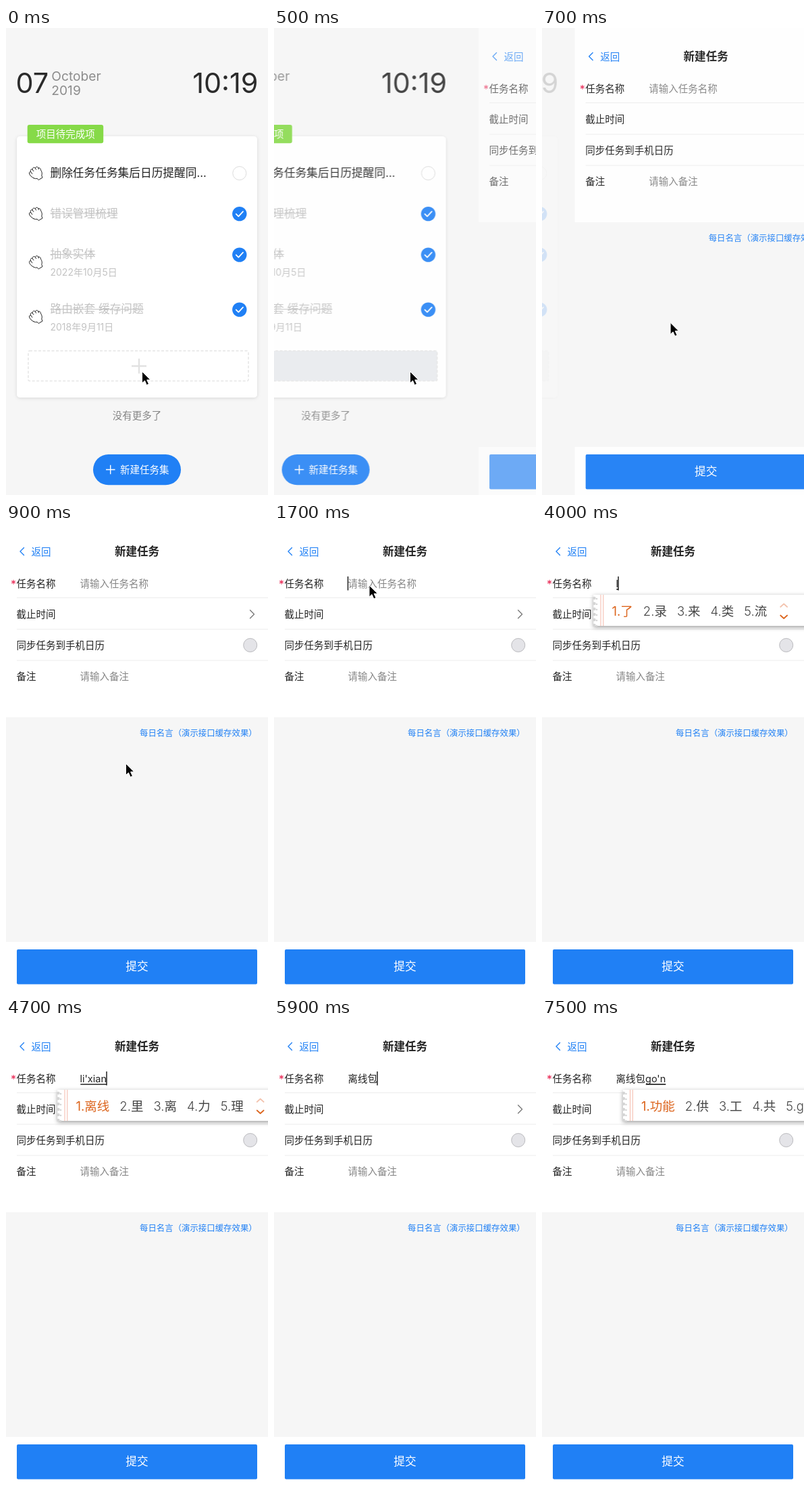
An HTML page that plays this animation: 388 by 690 pixels, repeating every 8000 ms.

```html
<!DOCTYPE html>
<html lang="zh">
<head>
<meta charset="utf-8">
<title>任务</title>
<style>
html, body { margin: 0; width: 100%; height: 100%; overflow: hidden; background: #f6f6f6; }
svg { display: block; width: 100%; height: 100%; }
text { font-family: Inter, "Noto Sans CJK SC", "Noto Sans CJK", sans-serif; font-size: 14.5px; fill: #222; white-space: pre; }
.item { font-size: 16.7px; }
.done { fill: #c3c3c3; }
.date { font-size: 14px; fill: #c3c3c3; }
.clock { font-size: 41.4px; fill: #2b2b2b; }
.month { font-size: 19.2px; fill: #8c8c8c; }
.hint { fill: #868686; }
.link { fill: #2080f5; font-weight: 500; }
.white { fill: #fff; }
.title { font-size: 16.56px; font-weight: 700; }
.cand { font-size: 18.5px; fill: #444; font-weight: 300; }
.line { fill: none; stroke-linecap: round; stroke-linejoin: round; }
</style>
</head>
<body>
<svg viewBox="0 0 388 690">
  <defs>
    <filter id="soft" x="-10%" y="-10%" width="120%" height="120%">
      <feDropShadow dx="0" dy="1" stdDeviation="2.5" flood-color="#000" flood-opacity=".13"/>
    </filter>
    <filter id="lift" x="-10%" y="-30%" width="120%" height="170%">
      <feDropShadow dx="0" dy="2" stdDeviation="3" flood-color="#000" flood-opacity=".4"/>
    </filter>
    <g id="hand" class="line" stroke="#222" stroke-width="1">
      <path d="M8 18.5 C4.500 17 1.500 14 1 11.500 C.6 9.500 2 8.500 3.300 9.200 C2 6.500 3.500 4.500 5.600 5.600 C5.500 2.800 8 1.700 9.800 3.400 C11 1 13.500 1.200 14.300 3.300 C16.500 2.700 18 4.200 18 6.400 C19.800 9 20.300 11.500 19.300 14.500 L20.500 17.500 L14.800 21 L12.500 18.800 C11 19.300 9.500 19.200 8 18.500"/>
      <path d="M3.300 9.200 L5.300 12 M5.600 5.600 L7.300 8 M9.800 3.400 L11 5.600 M14.300 3.300 L14.800 5"/>
    </g>
    <g id="tick">
      <circle r="10.700" fill="#2080f5"/>
      <path class="line" d="M-5 .2 L-1.500 3.700 L5.200 -3.400" stroke="#fff" stroke-width="1.800"/>
    </g>
  </defs>
  <rect width="388" height="690" fill="#f6f6f6"/>

  <g id="home">
    <text class="clock" x="14.500" y="95.500">07</text>
    <text class="month" x="67.300" y="78">October</text>
    <text class="month" x="67.300" y="99">2019</text>
    <text class="clock" x="373.500" y="95.500" text-anchor="end">10:19</text>
    <rect x="16" y="160" width="356" height="386" rx="5" fill="#fff" filter="url(#soft)"/>
    <rect x="31.700" y="143" width="112.500" height="27.300" rx="3" fill="#86da48"/>
    <text class="white" x="88.300" y="162" text-anchor="middle">项目待完成项</text>
    <g id="items"></g>
    <rect id="add" x="33" y="477" width="326" height="44.500" rx="2" fill="none" stroke="#e5e5e5" stroke-width="1.500" stroke-dasharray="4 2.500"/>
    <path id="plus" d="M186 499.500 H208 M197 488.500 V510.500" stroke="#e2e2e2" stroke-width="2.500"/>
    <text class="hint" x="194" y="577.500" text-anchor="middle">没有更多了</text>
    <rect x="129" y="630" width="130" height="45.300" rx="22.600" fill="#2080f5"/>
    <path d="M148 652.500 H161.500 M154.700 645.800 V659.200" stroke="#fff" stroke-width="1.400"/>
    <text class="white" x="169" y="658" font-weight="500">新建任务集</text>
  </g>

  <g id="form">
    <rect width="388" height="690" fill="#f6f6f6"/>
    <rect width="388" height="287" fill="#fff"/>
    <rect y="619" width="388" height="71" fill="#fff"/>
    <path class="line" d="M26.500 36.500 L21 42 L26.500 47.500" stroke="#2080f5" stroke-width="1.400"/>
    <text class="link" x="37.500" y="47.500">返回</text>
    <text class="title" x="194" y="48" text-anchor="middle">新建任务</text>
    <path d="M16 110.500 H388 M16 157 H388 M16 203 H388" stroke="#ececec"/>
    <text x="7" y="96" style="fill:#e8204e;font-size:16px">*</text>
    <text x="15.500" y="94.500">任务名称</text>
    <text x="15.500" y="140">截止时间</text>
    <text x="15.500" y="185.500">同步任务到手机日历</text>
    <text x="15.500" y="231.500">备注</text>
    <text class="hint" x="109.500" y="231.500">请输入备注</text>
    <path class="line" d="M361.500 128.700 L367.500 134.700 L361.500 140.700" stroke="#777" stroke-width="1.300"/>
    <circle cx="361.700" cy="180.500" r="10" fill="#e4e4e8" stroke="#b9b9bd"/>
    <text class="link" x="198" y="314.500" style="font-size:12.420px">每日名言（演示接口缓存效果）</text>
    <rect x="16" y="630" width="356" height="51.500" rx="2" fill="#2080f5"/>
    <text class="white item" x="194" y="661" text-anchor="middle">提交</text>
    <text id="hint" class="hint" x="109.500" y="94.500">请输入任务名称</text>
    <text id="value" x="109.500" y="94.500"></text>
    <path id="under" stroke="#222" stroke-width="1.700"/>
    <path id="caret" stroke="#111" stroke-width="1.400"/>
    <g id="ime">
      <rect y="106" width="420" height="46" fill="#fff" filter="url(#lift)"/>
      <g id="holes" fill="#d5d5d5"></g>
      <path d="M10.500 106 V152 M14.300 106 V152" stroke="#f4b9aa"/>
      <text id="cands" class="cand" x="27" y="137"></text>
      <g id="arrows" class="line" stroke-width="1.700">
        <path d="M-5 124 L0 119.500 L5 124" stroke="#f3c3ae"/>
        <path d="M-5 136.500 L0 141 L5 136.500" stroke="#dc641c"/>
      </g>
    </g>
  </g>

  <path id="mouse" d="M0 0 V17.200 L4 13.600 L6.800 20 L10 18.600 L7.200 12.400 H12.400 Z" fill="#000" stroke="#fff" stroke-width="1" stroke-linejoin="round"/>
</svg>
<script>
const LOOP = 8000;
const $ = id => document.getElementById(id);
const show = (el, on) => el.setAttribute('visibility', on ? 'inherit' : 'hidden');
const clamp = v => Math.min(1, Math.max(0, v));
const smooth = v => v * v * (3 - 2 * v);
const move = (el, x, y = 0) => el.setAttribute('transform', `translate(${x} ${y})`);

// text, centre line, optional date, hand position
const items = [
  ['删除任务任务集后日历提醒同...', 214, '', 214],
  ['错误管理梳理', 274, '', 274],
  ['抽象实体', 334.5, '2022年10月5日', 345.5],
  ['路由嵌套 缓存问题', 415.5, '2018年9月11日', 426]
];
$('items').innerHTML = items.map(([name, y, date, handY], i) => `
  <use href="#hand" x="33.500" y="${handY - 10.5}"/>
  <text class="item${i ? ' done' : ''}" x="65.500" y="${y + 5.5}">${name}</text>
  <text class="date" x="65.500" y="${y + 31}">${date}</text>
  ${i ? `<use href="#tick" x="345.800" y="${y + 0.6}"/>`
      : `<circle cx="345.800" cy="${y + 0.6}" r="10" fill="#fff" stroke="#dcdcdc"/>`}`).join('');

function strike() {
  document.querySelectorAll('.done').forEach((el, i) => {
    const y = items[i + 1][1];
    const w = el.getComputedTextLength();
    el.insertAdjacentHTML('afterend', `<path d="M65.500 ${y} h${w}" stroke="#c3c3c3" stroke-width="1.200"/>`);
  });
}
strike();

for (let y = 111; y < 152; y += 8) {
  $('holes').innerHTML += `<circle cx="1" cy="${y}" r="2.200"/><circle cx="4.500" cy="${y + 1}" r="1.300"/>`;
}

// time, committed text, composing text, candidates
const typing = [
  [0, '', ''],
  [2200, 'l', ''],
  [2400, 'li', ''],
  [2900, 'l', ''],
  [3000, '', ''],
  [3900, '', 'l', '了 录 来 类 流'],
  [4100, '', 'li', '里 离 力 理 立'],
  [4300, '', "li'x", '练习 联系 里 离 力'],
  [4400, '', "li'xi", '练习 离席 里 离 力'],
  [4500, '', "li'xia", '立夏 里 离 力 理'],
  [4700, '', "li'xian", '离线 里 离 力 理'],
  [5100, '', "li'xian'b", '离线包 离线 里 离 力'],
  [5300, '', "li'xian'ba", '离线包 离线 里 离 力'],
  [5500, '', "li'xian'bao", '离线包 离线 里 离 力'],
  [5900, '离线包', ''],
  [6700, '离线包', 'g', '个 给 过 该 跟'],
  [6800, '离线包', 'go', '够 狗 购 构 go'],
  [7000, '离线包', "go'n", '功能 供 工 共 go']
];
const blinks = [[3400, 3900], [6400, 6700], [7500, 8000]];

// time, x, y of the pointer tip
const track = [
  [0, 201.5, 507.5], [520, 201.5, 507.5], [900, 177.5, 356],
  [1250, 150, 130], [1500, 141, 92], [LOOP, 141, 92]
];

let shown = null;
let caretX = 109.5;

function drawField(step) {
  const [, fixed, draft, list] = step;
  const value = $('value');
  value.textContent = fixed;
  const startX = 109.5 + (fixed ? value.getComputedTextLength() : 0);
  value.textContent = fixed + draft;
  caretX = 109.5 + (fixed + draft ? value.getComputedTextLength() : 0);
  show($('hint'), !(fixed + draft));
  show($('under'), draft);
  $('under').setAttribute('d', `M${startX + 0.8} 98 H${caretX}`);
  show($('ime'), draft);
  if (!draft) return;
  move($('ime'), startX - 33);
  const cands = $('cands');
  cands.innerHTML = list.split(' ').map((word, i) =>
    `<tspan dx="${i ? 15 : 0}"${i ? '' : ' fill="#dc641c" font-weight="400"'}>${i + 1}.${word}</tspan>`).join('');
  move($('arrows'), cands.getEndPositionOfChar(cands.getNumberOfChars() - 1).x + 25);
}

function drawSlide(t) {
  const p = smooth(clamp((t - 374) / 420));
  move($('home'), -388 * p ** 0.787);
  $('home').setAttribute('opacity', 1 - p ** 1.36);
  show($('home'), p < 1);
  move($('form'), 388 * (1 - p));
  $('form').setAttribute('opacity', p ** 0.3);
  show($('form'), p > 0);
  const pressed = t >= 374;
  $('add').setAttribute('fill', pressed ? '#e9ebee' : 'none');
  show($('plus'), !pressed);
}

function drawMouse(t) {
  const i = track.findIndex(k => k[0] > t);
  const [a, b] = [track[i - 1], track[i]];
  const p = (t - a[0]) / (b[0] - a[0]);
  move($('mouse'), a[1] + (b[1] - a[1]) * p, a[2] + (b[2] - a[2]) * p);
  show($('mouse'), t < 2200);
}

function draw(t) {
  drawSlide(t);
  drawMouse(t);
  const step = typing.filter(s => s[0] <= t).pop();
  if (step !== shown) drawField(shown = step);
  show($('caret'), t >= 1700 && !blinks.some(([a, b]) => t >= a && t < b));
  $('caret').setAttribute('d', `M${caretX} 79 V99.500`);
}

const start = performance.now();
function tick(now) {
  draw(Math.max(0, now - start) % LOOP);
  requestAnimationFrame(tick);
}
draw(0);
requestAnimationFrame(tick);
</script>
</body>
</html>
```
